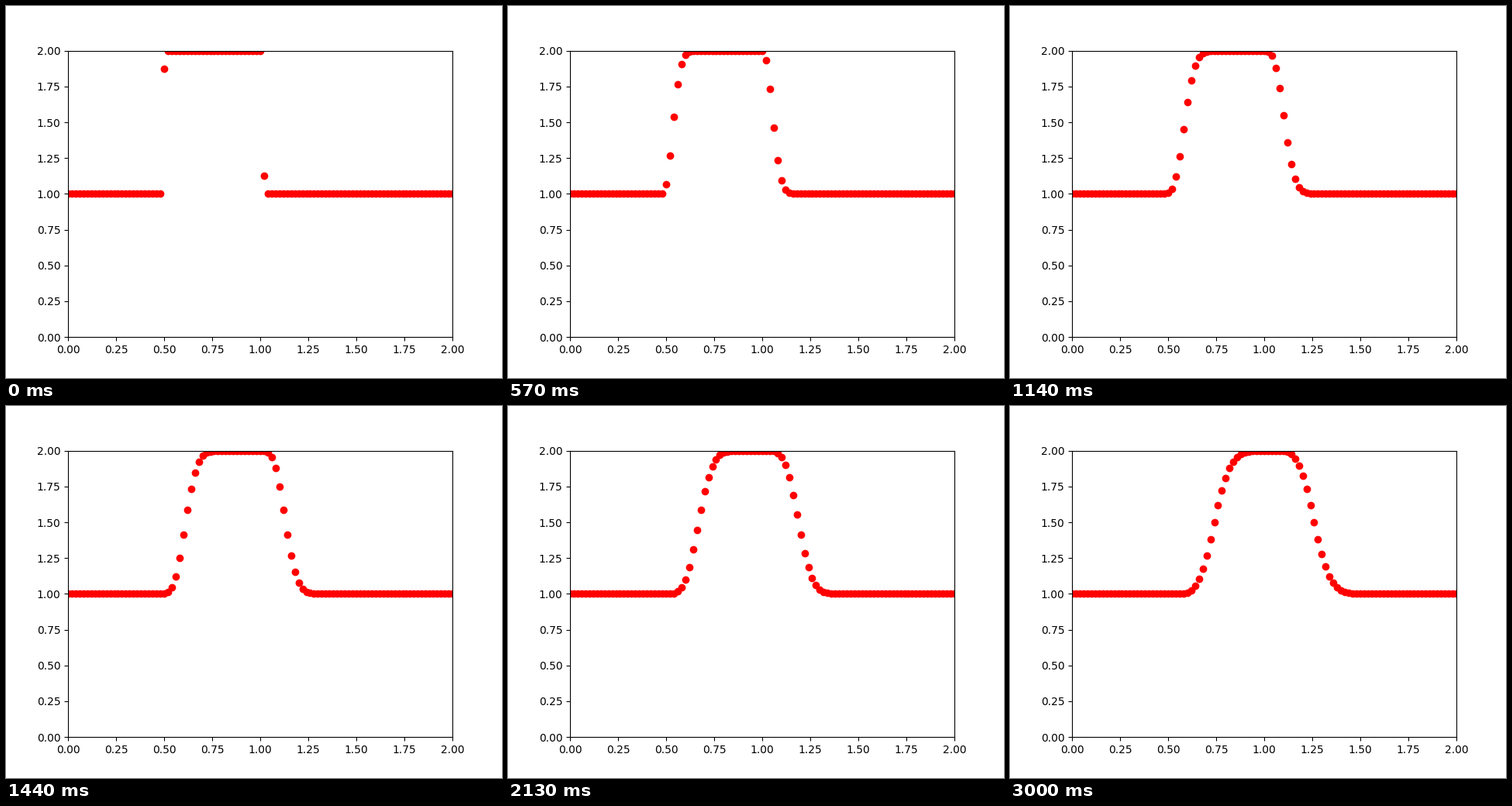
A matplotlib script for the animation above (3030 ms loop, 640x480 px).

```python
import numpy as np
import matplotlib.pyplot as plt
from matplotlib.animation import FuncAnimation

# 1D linear convection of a square pulse, first-order upwind scheme
LENGTH = 2.0
POINTS = 101
COURANT = 0.125
FRAMES = 101
INTERVAL = 30


def solve(u, steps):
    """Return the profile after 1, 2, ... steps."""
    profiles = []
    for _ in range(steps):
        u = u.copy()
        u[1:] -= COURANT * np.diff(u)
        profiles.append(u)
    return profiles


x = np.linspace(0, LENGTH, POINTS)
pulse = np.ones(POINTS)
pulse[25:51] = 2.0  # 0.5 <= x <= 1
profiles = solve(pulse, FRAMES)

fig, ax = plt.subplots(figsize=(6.4, 4.8), dpi=100)
ax.set_xlim(0, LENGTH)
ax.set_ylim(0, 2)
dots, = ax.plot(x, profiles[0], "ro")


def update(i):
    dots.set_ydata(profiles[i])
    return dots,


anim = FuncAnimation(fig, update, frames=FRAMES, interval=INTERVAL,
                     repeat=True, repeat_delay=0)
plt.show()
```
